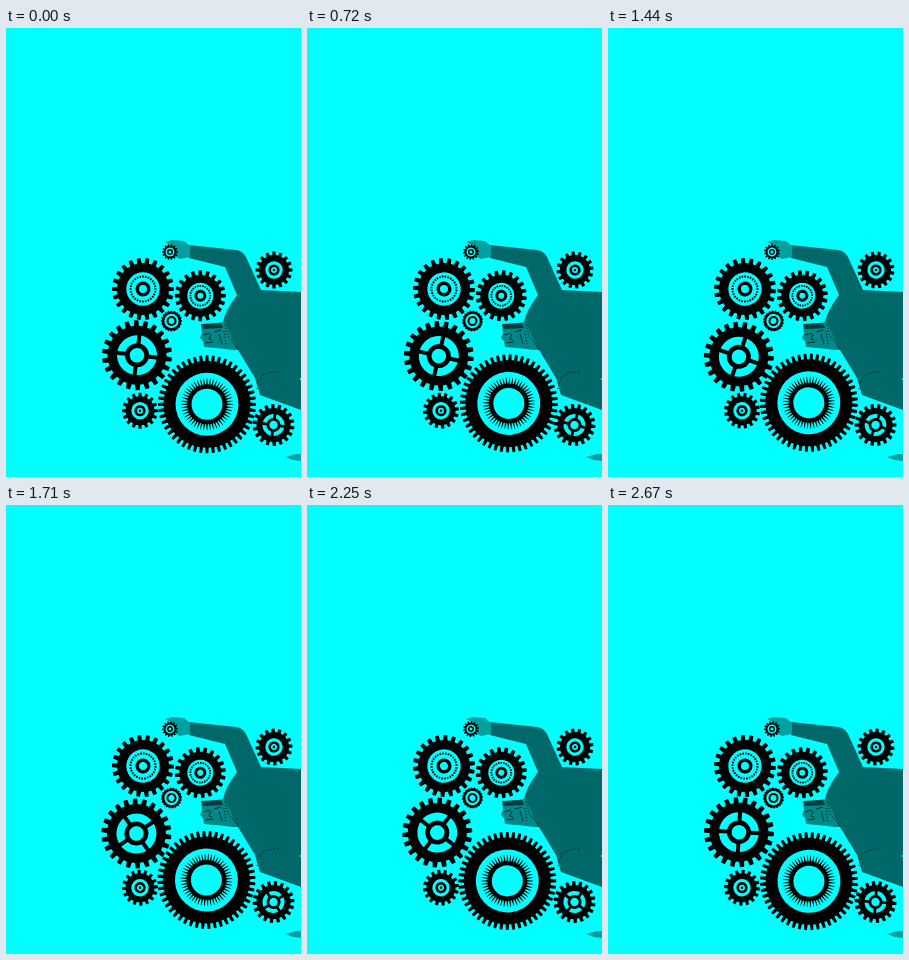
Recreate the animation shown at these times as an HTML page. Size 295 px wide and 449 px high, loop 2700 ms.

```html
<!DOCTYPE html>
<html lang="en">
<head>
<meta charset="utf-8">
<title>Gears</title>
<style>
  html, body { margin: 0; width: 100%; height: 100%; overflow: hidden; background: #0ff; }
  svg { display: block; width: 295px; height: 449px; }
</style>
</head>
<body>
<svg id="stage" viewBox="0 0 295 449" fill="none">
  <g id="figure">
    <path fill="#006868" d="M183 217 230 222Q237 223 240 229L255 262 295 264V382L254 367 249 350 232 322 219 321 217 294Q219 283 231 267L219 239 183 230Z"/>
    <path fill="#00a0a0" d="M159 214 166 212 178 213 184 218V229L174 231 162 225 167 218Z"/>
    <path fill="#00a0a0" d="M279 429 290 426 295 426V433L287 432Z"/>
    <path fill="#008888" d="M195 297 218 294 224 305 231 322 198 319 197 313 194 310 196 305Z"/>
    <path fill="#003c3c" d="M195 296 215 295 217 300 197 301Z"/>
    <path stroke="#002c2c" d="M197 307 204 305M208 304 215 302M205 306 203 311 206 312M199 315 207 314M213 306 216 316"/>
    <path stroke="#000" stroke-dasharray="1 2" d="M219 297 222 308 232 321M218 303 220 317M251 361Q252 343 273 344"/>
    <path fill="#0ff" d="M294 350h1v2h-1z"/>
  </g>
</svg>
<script>
const LOOP = 2700, STEP = 30;
const stage = document.getElementById('stage');

function add(parent, tag, attrs) {
  const node = document.createElementNS('http://www.w3.org/2000/svg', tag);
  for (const key in attrs) node.setAttribute(key, attrs[key]);
  return parent.appendChild(node);
}

// A ring of evenly spaced bars between two radii.
function bars(g, inner, outer, count, share = 0.5) {
  add(g, 'circle', {
    r: (inner + outer) / 2, stroke: '#000', 'stroke-width': outer - inner,
    pathLength: count, 'stroke-dasharray': `${share} ${1 - share}`,
    'stroke-dashoffset': share / 2
  });
}

// Tapered teeth standing on a circle.
function taper(g, inner, outer, count, base, top) {
  const pitch = 2 * Math.PI / count;
  const point = (r, a) => `${r * Math.cos(a)} ${r * Math.sin(a)}`;
  let d = '';
  for (let i = 0; i < count; i++) {
    const a = i * pitch, b = base * pitch / 2, t = top * pitch / 2;
    d += `M${point(inner, a - b)}L${point(outer, a - t)} ${point(outer, a + t)} ${point(inner, a + b)}Z`;
  }
  add(g, 'path', { d, fill: '#000' });
}

// Discs alternate black and cyan from the rim inwards.
function gear({ x, y, tip, teeth, discs, dir = 1, wobble = 0, phase = 0 }, detail) {
  const spin = add(stage, 'g');
  const g = add(spin, 'g', { transform: `translate(0 ${wobble}) rotate(${phase})` });
  taper(g, discs[0] - 1, tip, teeth, 0.64, 0.42);
  discs.forEach((r, i) => add(g, 'circle', { r, fill: i % 2 ? '#0ff' : '#000' }));
  if (detail) detail(g);
  return angle => spin.setAttribute('transform', `translate(${x} ${y}) rotate(${angle * dir})`);
}

function spokes(inner, outer, width) {
  return g => add(g, 'path', {
    stroke: '#000', 'stroke-width': width,
    d: `M${inner} 0H${outer}M${-inner} 0H${-outer}M0 ${inner}V${outer}M0 ${-inner}V${-outer}`
  });
}

const gears = [
  gear({ x: 137, y: 261, tip: 31, teeth: 22, discs: [26, 16.7, 7.5, 4], dir: -1 },
    g => bars(g, 11.5, 13.5, 28, 0.6)),
  gear({ x: 194.3, y: 267.7, tip: 25.5, teeth: 20, discs: [21, 13, 6, 3] },
    g => bars(g, 9, 10.8, 24, 0.6)),
  gear({ x: 165.5, y: 293, tip: 10.5, teeth: 20, discs: [9.8, 7.2, 5, 3] }),
  gear({ x: 131, y: 328, tip: 35, teeth: 22, discs: [29.5, 20, 12, 7.3], wobble: -0.8, phase: 7 },
    spokes(11, 21, 4)),
  gear({ x: 201, y: 375.5, tip: 49, teeth: 48, discs: [43.5, 31.5, 20, 15.5], dir: -1, wobble: 0.8 },
    g => taper(g, 19, 26, 48, 0.7, 0.15)),
  gear({ x: 268, y: 242, tip: 18.5, teeth: 16, discs: [15, 8.7, 5.6, 3, 1.3], dir: -1 }),
  gear({ x: 134, y: 382.7, tip: 18, teeth: 16, discs: [14.5, 8.7, 5.6, 3, 1.3], dir: -1 }),
  gear({ x: 267.5, y: 397, tip: 21, teeth: 18, discs: [17, 11, 7, 4.2], phase: 8 },
    spokes(6, 12, 2.8)),
  gear({ x: 164, y: 224, tip: 8, teeth: 14, discs: [6.5, 4.5, 3, 1.5] })
];

function draw(now) {
  const angle = Math.floor(now % LOOP / STEP) * STEP / LOOP * 360;
  gears.forEach(turn => turn(angle));
  requestAnimationFrame(draw);
}
draw(performance.now());
</script>
</body>
</html>
```
